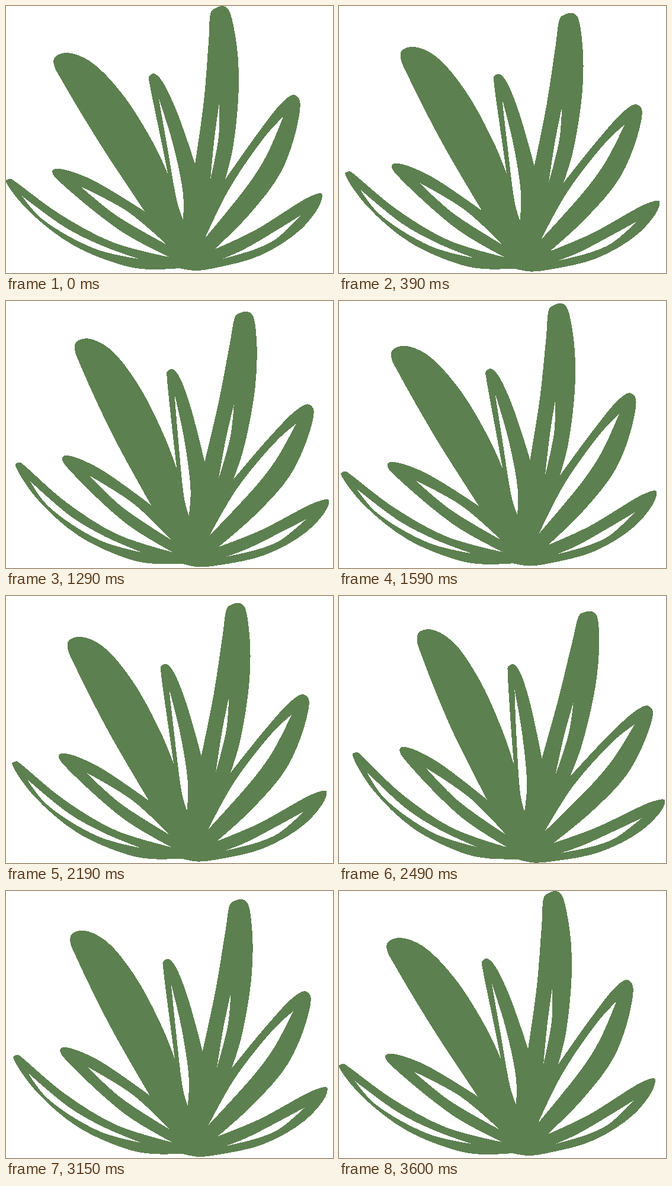
An HTML page that plays this animation: 552 by 451 pixels, repeating every 3630 ms.

```html
<!DOCTYPE html>
<html lang="en">
<head>
<meta charset="utf-8">
<title>Swaying leaves</title>
<style>
  html, body { margin: 0; width: 100%; height: 100%; overflow: hidden; background: #fff; }
  svg { display: block; width: 552px; height: 451px; }
</style>
</head>
<body>
<svg viewBox="0 0 552 451"><path id="plant" fill="#5d8050" fill-rule="evenodd" shape-rendering="crispEdges"/></svg>
<script>
const LOOP = 3630, TICK = 30, TICKS_PER_POSE = 2.5, POSES = 24, PHASE = 0.2;
const plant = document.getElementById("plant");

// Runs are smooth curves through x, y pairs; they meet in sharp corners.
const outline = [], holes = [];
const pairs = n => n.flatMap((x, i) => i % 2 ? [] : [[x, n[i + 1]]]);
const leaf = (...n) => outline.push(pairs(n));
const hole = (...sides) => holes.push(sides.map(pairs));

leaf(293,443, 245,445, 205,440, 115,405, 40,348, 3,303, 0,295, 8,292, 16,297, 90,351, 180,399);
leaf(275,424, 195,381, 95,301, 79,284, 79,277, 90,275, 140,291);
leaf(234,347, 160,235, 95,127, 81,100, 82,87, 101,79, 140,92, 195,147, 250,234);
leaf(273,283, 262,228, 242,129, 241,120, 249,114, 260,122, 282,163, 307,230);
leaf(319,267, 334,160, 342,60, 346,10, 351,5, 364,0, 374,4, 387,50, 393,130, 383,240);
leaf(370,293, 425,215, 467,162, 485,150, 495,157, 493,195, 465,279, 410,353);
leaf(352,411, 420,379, 515,321, 533,317, 531,333, 498,377, 430,421, 355,442, 320,447);

hole([27,321, 100,374, 160,404], [223,427, 150,410, 60,359]);
hole([126,305, 205,347], [271,403, 185,353]);
hole([258,157, 281,230, 299,318], [299,361, 290,335, 270,225]);
hole([360,164, 359,220], [345,293, 352,222]);
hole([468,187, 440,252, 410,300], [336,392, 378,307, 440,217]);
hole([497,354, 455,394, 420,411], [366,427, 400,412, 450,383]);

// Bends the whole plant to the right, more so the higher a point lies
function bend([x, y], q) {
  const u = 430 - y;
  const dx = 9.5 + 0.081 * u + 0.00014 * u * u - 0.00007 * (x - 310) * u;
  const dy = (x - 270) * (0.081 + 0.0003 * u) + 0.00005 * u * u;
  return [x + dx * q, y + dy * q];
}

// Bezier handle at b, towards c, of a centripetal Catmull-Rom spline
function handle(a, b, c) {
  if (!a) return b;
  const s = Math.sqrt(Math.hypot(b[0] - a[0], b[1] - a[1]));
  const t = Math.sqrt(Math.hypot(c[0] - b[0], c[1] - b[1]));
  return b.map((v, i) =>
    (s * s * c[i] - t * t * a[i] + (2 * s * s + 3 * s * t + t * t) * v) / (3 * s * (s + t)));
}

function curve(p) {
  let d = "";
  for (let i = 0; i < p.length - 1; i++) {
    const nums = [...handle(p[i - 1], p[i], p[i + 1]), ...handle(p[i + 2], p[i + 1], p[i]), ...p[i + 1]];
    d += "C" + nums.map(n => n.toFixed(2)).join(" ");
  }
  return d;
}

function contour(runs, q) {
  const parts = runs.map(run => run.map(p => bend(p, q)));
  const d = parts.map((part, i) => curve([...part, parts[(i + 1) % parts.length][0]]));
  return "M" + parts[0][0].join(" ") + d.join("") + "Z";
}

const lean = pose => (1 - Math.cos(2 * Math.PI * (pose + PHASE) / POSES)) / 2 / 0.977;

let shown = -1;
function draw(now) {
  const pose = Math.floor(Math.floor((now % LOOP) / TICK) / TICKS_PER_POSE);
  if (pose === shown) return;
  shown = pose;
  const q = lean(pose);
  plant.setAttribute("d", [outline, ...holes].map(runs => contour(runs, q)).join(""));
}

const start = performance.now();
function loop() {
  draw(performance.now() - start);
  requestAnimationFrame(loop);
}
loop();
</script>
</body>
</html>
```
